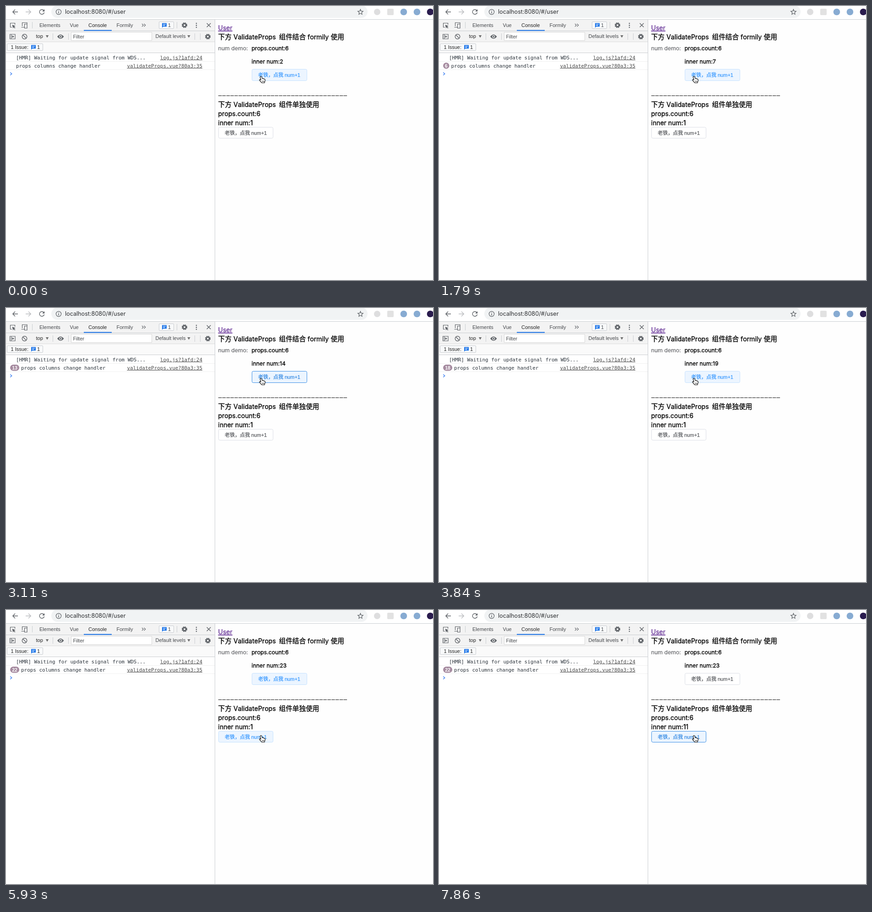
These frames come from a looping animation (933x600 px, 8 s). An HTML page:

```html
<!DOCTYPE html>
<html lang="zh">
<head>
<meta charset="utf-8">
<title>User</title>
<style>
html, body { margin: 0; width: 100%; height: 100%; overflow: hidden; background: #fff; }
svg { display: block; width: 933px; height: 600px; }
text { white-space: pre; }
.ui { font: 11px "Liberation Sans", Arial, sans-serif; fill: #45484c; }
.log { font: 10.95px "DejaVu Sans Mono", monospace; fill: #2b333b; }
.link { text-decoration: underline; fill: #4c4c4c; }
.url { font: 12.63px Inter, sans-serif; fill: #2c2e31; }
.page { font: 14px Inter, "Noto Sans CJK SC", "Noto Sans CJK", sans-serif; font-kerning: none; fill: #000; stroke: #000; stroke-width: .3; }
.small { font-size: 12.3px; }
.page .name { font-size: 14.1px; }
.page .label { fill: #606266; stroke: #606266; stroke-width: .15; }
.page .visited { fill: #551a8b; stroke: #551a8b; stroke-width: .15; text-decoration: underline; }
.page .rule { font: 13px "Liberation Sans", sans-serif; letter-spacing: 1.6px; }
.zh { font: 14.67px "Noto Sans CJK SC", "Noto Sans CJK", sans-serif; }
.btn text { font: 11px "Liberation Sans", "Noto Sans CJK SC", "Noto Sans CJK", sans-serif; stroke: currentColor; stroke-width: .25; fill: currentColor; }
.btn .cn { font: 500 11px "Noto Sans CJK SC", "Noto Sans CJK", sans-serif; }
.badge { font: bold 10.5px "Liberation Sans", Arial, sans-serif; fill: #fff; }
.line { fill: none; stroke: #5f6368; stroke-width: 1.4; }
.thin { stroke-width: 1.2; }
.sep { stroke: #cacdd1; stroke-width: 1; }
</style>
</head>
<body>
<svg viewBox="0 0 933 600">
  <defs>
    <g id="gear">
      <circle r="4.9" fill="none" stroke="#5f6368" stroke-width="2.4" stroke-dasharray="2.6 1.25"/>
      <circle r="3.3" fill="none" stroke="#5f6368" stroke-width="2.6"/>
    </g>
    <g id="bubble">
      <path d="M-5-4.5H5V3.2H-2.5L-5 5.5Z" fill="#1a73e8"/>
      <path d="M-3-2H3M-3 .6H1.5" stroke="#fff" stroke-width="1.1"/>
    </g>
    <path id="tri" d="M-3.2-2.6H3.2L0 3Z" fill="#6e6e6e"/>
  </defs>
  <rect width="933" height="600" fill="#fefefe"/>

  <!-- address bar -->
  <rect width="933" height="29" fill="#fff"/>
  <rect x="99" y="-1" width="691" height="27" rx="13.5" fill="#f1f3f4"/>
  <path class="sep" d="M0 29.5H933"/>
  <path class="line" d="M26 13H15M20 7.8L14.8 13L20 18.2"/>
  <path class="line" style="stroke:#bbbdc0" d="M43 13H54M49 7.8L54.2 13L49 18.2"/>
  <path class="line" d="M82.8 10.2A5.2 5.2 0 1 0 83.5 14"/>
  <path d="M84.2 7V12H79.2Z" fill="#5f6368"/>
  <circle class="line thin" cx="115" cy="13" r="5.6"/>
  <path class="line" d="M115 12V16.2M115 9.4V10.8"/>
  <text class="url" x="129" y="17.3">localhost:8080/#/user</text>
  <path id="star" class="line thin"/>
  <circle cx="811" cy="13" r="7" fill="#dededf"/>
  <rect x="833" y="6" width="14" height="14" rx="2" fill="#e2e2e2"/>
  <circle cx="869" cy="13" r="7.3" fill="#87abd2"/>
  <circle cx="898" cy="13" r="7.3" fill="#87abd2"/>
  <circle cx="927" cy="13" r="7.3" fill="#2a1c4e"/>

  <!-- developer tools -->
  <rect y="30" width="456" height="49" fill="#f3f3f3"/>
  <rect y="79" width="456" height="23" fill="#fafafa"/>
  <path class="sep" d="M0 54.5H456M0 102.5H456M456.5 30V600"/>
  <path d="M0 78.5H456" stroke="#dcdcdc"/>
  <path class="sep" d="M57.5 35V49M373.5 35V49M102.5 60V74M136.5 60V74M412.5 60V74M424.5 60V74"/>
  <path class="line thin" d="M13 46.5H9.5V37.5H19.5V41"/>
  <path d="M13.5 41L21 44L17.8 45.2L20.4 47.8L19.2 49L16.6 46.4L15.4 49Z" fill="#5f6368"/>
  <path class="line thin" d="M35.5 44V36.5H46V39M33.5 46.5H40M40.5 39.5H46V48.5H40.5Z"/>
  <g class="ui">
    <text x="73" y="46">Elements</text>
    <text x="139.5" y="46">Vue</text>
    <text x="180" y="46" fill="#222">Console</text>
    <text x="241.5" y="46">Formily</text>
    <text x="65.5" y="70" fill="#222">top</text>
    <text x="326.5" y="70">Default levels</text>
  </g>
  <rect x="170" y="52.5" width="61" height="2" fill="#1a73e8"/>
  <path class="line thin" d="M297 38.8L300.2 42L297 45.2M301.5 38.8L304.7 42L301.5 45.2"/>
  <rect x="334.5" y="34.5" width="32" height="15" rx="1.5" fill="#f8f9fa" stroke="#cacdd1"/>
  <use href="#bubble" x="346" y="42"/>
  <text class="ui" x="354" y="46">1</text>
  <use href="#gear" x="390" y="42"/>
  <path d="M416 38V47" stroke="#5f6368" stroke-width="2.6" stroke-linecap="round" stroke-dasharray="0 4.4"/>
  <path class="line" d="M438.7 37.7L447.3 46.3M447.3 37.7L438.7 46.3"/>
  <path class="line thin" d="M8.5 62H20V72H8.5ZM11.5 62V72"/>
  <path d="M13.5 64.2L18 67L13.5 69.8Z" fill="#5f6368"/>
  <circle class="line" cx="40.5" cy="67" r="5.2"/>
  <path class="line" d="M36.8 63.3L44.2 70.7"/>
  <use href="#tri" x="90" y="66.5"/>
  <path d="M112 67Q119 58 126.5 67Q119 76 112 67Z" fill="#5f6368"/>
  <circle cx="119.2" cy="67" r="2.4" fill="#5f6368" stroke="#f3f3f3" stroke-width="1.2"/>
  <rect x="142.5" y="57.5" width="176" height="18" fill="#fff" stroke="#d8d8d8"/>
  <text class="ui" x="146.5" y="71">Filter</text>
  <use href="#tri" x="399.5" y="66.5"/>
  <use href="#gear" x="441" y="67"/>
  <rect x="2.5" y="82.5" width="78" height="15" rx="1.5" fill="#f8f9fa" stroke="#cacdd1"/>
  <text class="ui" x="10.5" y="94" style="fill:#222">1 Issue:</text>
  <use href="#bubble" x="60" y="90"/>
  <text class="ui" x="68" y="94" style="fill:#222">1</text>

  <!-- console -->
  <rect y="103" width="456" height="497" fill="#fff"/>
  <path d="M0 121.5H456M0 139.5H456" stroke="#f0f0f0"/>
  <g class="log">
    <text x="22" y="116.5">[HMR] Waiting for update signal from WDS...</text>
    <text class="link" x="429" y="116.5" text-anchor="end">log.js?1afd:24</text>
    <text id="msg" y="134.7">props columns change handler</text>
    <text class="link" x="429" y="134.7" text-anchor="end">validateProps.vue?80a3:35</text>
  </g>
  <rect id="pill" x="9" y="124" height="13.5" rx="6.75" fill="#a58a9f"/>
  <text id="badge" class="badge" y="134.5" text-anchor="middle"/>
  <path d="M9.3 145.5L12.6 148.5L9.3 151.5" fill="none" stroke="#367cf1" stroke-width="1.4"/>

  <!-- page -->
  <g class="page">
    <text class="visited" x="463.5" y="53">User</text>
    <text class="zh" x="463.5" y="73">下方</text>
    <text class="name" x="497" y="73">ValidateProps</text>
    <text class="zh" x="596.5" y="73">组件结合</text>
    <text class="name" x="659" y="73">formily</text>
    <text class="zh" x="709.5" y="73">使用</text>
    <text class="small label" x="463.5" y="96.5">num demo:</text>
    <text class="small" x="536.5" y="96.5">props.count:6</text>
    <text class="small" id="numA" x="536.5" y="125.7"/>
    <text class="rule" id="rule" x="464" y="200.2"/>
    <text class="zh" x="463.5" y="220.5">下方</text>
    <text class="name" x="497" y="220.5">ValidateProps</text>
    <text class="zh" x="596.5" y="220.5">组件单独使用</text>
    <text x="463.5" y="240.5">props.count:6</text>
    <text id="numB" x="463.5" y="260.5"/>
  </g>
  <g id="btnA" class="btn" transform="translate(537 138)"></g>
  <g id="btnB" class="btn" transform="translate(464 265)"></g>
  <g id="hand">
    <path d="M3.2 1.6C4.2 .6 5.6 1.2 5.9 2.4L7 6C8 5.4 8.9 5.8 9.2 6.6C10.2 6 11.1 6.5 11.4 7.4C12.4 7 13.3 7.5 13.4 8.6C13.7 10.6 13.3 12.2 12.4 13.4L12.2 15.5H6C5.2 14 3 12.3 1.2 9.8C.4 8.6 1.8 7.4 3 8.2L4.2 9.3L2.6 3.2C2.4 2.5 2.6 2 3.2 1.6Z" fill="#fff" stroke="#000" stroke-width="1.1" stroke-linejoin="round"/>
    <path d="M7.3 11V13.5M9.1 11V13.5M10.9 11V13.5" stroke="#000" stroke-width=".8"/>
  </g>
</svg>
<script>
const LOOP = 8000;
const $ = id => document.getElementById(id);

// fill, border, label
const LOOK = {
  idle:  ['#ffffff', '#dcdfe6', '#55575b'],
  half:  ['#f6faff', '#d1e1f3', '#4577ad'],
  hover: ['#ecf5ff', '#c6e2ff', '#3597ff'],
  press: ['#ecf5ff', '#3a8ee6', '#3087e2']
};

// time, count, button state
const upper = [
  [0, 2, 'hover'], [440, 2, 'press'], [590, 3, 'press'], [740, 3, 'hover'],
  [1040, 3, 'press'], [1190, 4, 'hover'], [1340, 4, 'press'], [1490, 5, 'press'],
  [1640, 6, 'hover'], [1790, 7, 'hover'], [1930, 8, 'hover'], [2080, 8, 'press'],
  [2220, 9, 'press'], [2370, 10, 'press'], [2520, 11, 'press'], [2670, 12, 'hover'],
  [2820, 13, 'hover'], [2970, 14, 'hover'], [3110, 14, 'press'], [3260, 15, 'press'],
  [3400, 16, 'press'], [3550, 17, 'press'], [3700, 18, 'hover'], [3840, 19, 'hover'],
  [3990, 20, 'hover'], [4140, 20, 'press'], [4290, 21, 'press'], [4440, 22, 'press'],
  [4590, 23, 'hover'], [6080, 23, 'idle']
];
const lower = [
  [0, 1, 'idle'], [5490, 1, 'half'], [5630, 1, 'hover'], [6080, 1, 'press'],
  [6230, 2, 'hover'], [6380, 3, 'hover'], [6520, 3, 'press'], [6670, 4, 'press'],
  [6820, 5, 'press'], [7120, 6, 'hover'], [7270, 7, 'hover'], [7420, 8, 'press'],
  [7560, 9, 'press'], [7710, 10, 'press'], [7860, 11, 'press']
];
// time, pointer top
const pointer = [[0, 152.8], [5340, 202], [5490, 273.8]];

const at = (steps, t) => steps.findLast(s => s[0] <= t);

function paint(id, state) {
  const [fill, border, label] = LOOK[state];
  const g = $(id), box = g.firstElementChild;
  box.setAttribute('fill', fill);
  box.setAttribute('stroke', border);
  g.style.color = label;
}

function draw(t) {
  const [, a, lookA] = at(upper, t);
  const [, b, lookB] = at(lower, t);
  const repeats = a - 1, grouped = repeats > 1;
  const width = repeats > 9 ? 20 : 13.5;
  $('numA').textContent = 'inner num:' + a;
  $('numB').textContent = 'inner num:' + b;
  $('badge').textContent = grouped ? repeats : '';
  $('badge').setAttribute('x', 9 + width / 2);
  $('pill').setAttribute('width', grouped ? width : 0);
  $('msg').setAttribute('x', grouped ? width + 13 : 22);
  paint('btnA', lookA);
  paint('btnB', lookB);
  $('hand').setAttribute('transform', `translate(552.8 ${at(pointer, t)[1]})`);
}

function addButton(id, width, height) {
  $(id).innerHTML = `<rect x=".5" y=".5" width="${width}" height="${height}" rx="2.8"/>` +
    '<text class="cn" x="14" y="16.8">老铁，点我</text><text x="72" y="16.8">num+1</text>';
}

addButton('btnA', 120, 25);
addButton('btnB', 119, 24);
$('rule').textContent = '–'.repeat(32);
$('star').setAttribute('d', 'M' + Array.from({ length: 10 }, (_, i) => {
  const r = i % 2 ? 2.7 : 6, k = i * Math.PI / 5;
  return (774.5 + r * Math.sin(k)).toFixed(1) + ' ' + (13.4 - r * Math.cos(k)).toFixed(1);
}).join('L') + 'Z');

const start = performance.now();
function tick() {
  draw((performance.now() - start) % LOOP);
  requestAnimationFrame(tick);
}
tick();
</script>
</body>
</html>
```
